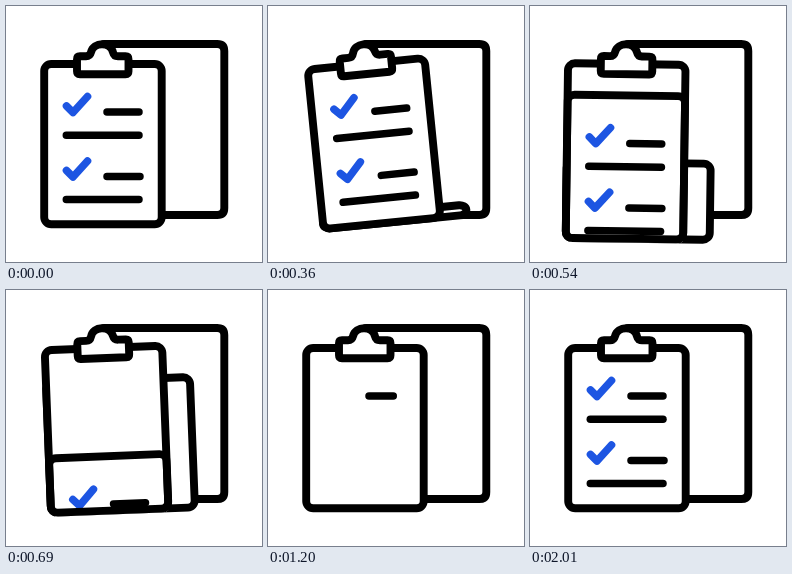
An HTML page that plays this animation: 256 px wide and 256 px high, repeating every 2280 ms.

```html
<!DOCTYPE html>
<html lang="en">
<head>
<meta charset="utf-8">
<title>Clipboard checklist</title>
<style>
html, body { margin: 0; width: 100%; height: 100%; overflow: hidden; background: #fff; }
svg { display: block; width: 100vw; height: 100vh; }
.ink { fill: #fff; stroke: #000; stroke-width: 7.9; stroke-linecap: round; stroke-linejoin: round; }
.line { stroke-width: 7.5; }
.tick { fill: none; stroke: #1d55e2; stroke-width: 7.6; }
#front { fill: #fff; }
#outline { fill: none; }
</style>
</head>
<body>
<svg viewBox="0 0 256 256">
  <defs><clipPath id="sheetClip"><rect id="clipBox" x="34.2" y="54" width="125.500" rx="10"/></clipPath></defs>
  <path class="ink" d="M98 38H211.300Q218.300 38 218.300 45V202Q218.300 209 211.300 209H150"/>
  <g id="board">
    <rect id="spare" class="ink" x="38.2" rx="7"/>
    <rect id="front" x="38.2" y="58" width="117.500" rx="7"/>
    <g clip-path="url(#sheetClip)">
      <g id="sheet">
        <rect id="sheetEdge" class="ink" x="38.2" y="58" width="117.500" height="190" rx="7"/>
        <g id="marks"></g>
      </g>
    </g>
    <rect id="outline" class="ink" x="38.2" y="58" width="117.500" rx="7"/>
    <path class="ink" d="M74 50.300H80Q84 50.300 85 46.300C87.500 35.600 104.500 35.600 107 46.300Q108 50.300 112 50.300H119.500Q122.500 50.300 122.500 53.300V65.200Q122.500 68.200 119.500 68.200H74Q71 68.200 71 65.200V53.300Q71 50.300 74 50.300Z"/>
  </g>
</svg>
<script>
const LOOP = 2280, TOP = 58, REST = 218.2;
const $ = id => document.getElementById(id);
const set = (el, attrs) => { for (const k in attrs) el.setAttribute(k, attrs[k]); };
const ramp = (t, a, b) => Math.min(1, Math.max(0, (t - a) / (b - a)));
const ease = (t, a, b) => (1 - Math.cos(Math.PI * ramp(t, a, b))) / 2;

// Each mark is a path and the time span in which it is drawn.
const tick = y => `M60.500 ${y}L67 ${y + 6.5}L81.500 ${y - 9.5}`;
const marks = [
  ['line', 'M101 106H133', 1110, 1230],
  ['line', 'M60.300 129.300H133', 1230, 1400],
  ['line', 'M101 170.500H134', 1400, 1500],
  ['line', 'M60.300 193.500H133', 1500, 1675],
  ['tick', tick(100), 1675, 1840],
  ['tick', tick(164.5), 1840, 2005]
].map(([kind, d, from, to]) => {
  const el = document.createElementNS('http://www.w3.org/2000/svg', 'path');
  set(el, { class: 'ink ' + kind, d });
  $('marks').append(el);
  return { el, from, to, length: el.getTotalLength() };
});

// Swing of the board: time, angle.
const swing = [[0, 0], [200, 3.9], [450, -9.5], [573, 2.7], [700, -2.3], [840, 0]];

function angleAt(t) {
  let angle = 0;
  for (let i = 1; i < swing.length; i++) {
    const [a, from] = swing[i - 1], [b, to] = swing[i];
    if (t >= a) angle = from + (to - from) * ease(t, a, b);
  }
  return angle;
}

function draw(t) {
  const bottom = REST + 14.5 * Math.sin(Math.PI * ramp(t, 380, 710));
  const height = bottom - TOP;
  const erased = t >= 870;

  set($('board'), { transform: `rotate(${angleAt(t)} 96 47)` });
  set($('front'), { height });
  set($('outline'), { height });
  set($('clipBox'), { height: height + 8 });

  const rise = height * ease(t, 262, 870);
  const reach = 26.5 * ease(t, 240, 320) * (1 - ease(t, 990, 1180));
  set($('spare'), { y: bottom - rise, height: rise, width: 117.5 + reach });
  $('spare').style.display = reach > 0 ? '' : 'none';

  const drop = erased ? 0 : 160 * ease(t, 405, 870);
  set($('sheet'), { transform: `translate(0 ${drop})` });
  $('sheetEdge').style.display = drop > 0 ? '' : 'none';

  for (const { el, from, to, length } of marks) {
    const part = erased ? ramp(t, from, to) : 1;
    el.style.display = part > 0 ? '' : 'none';
    el.style.strokeDasharray = part < 1 ? `${length * part} ${length * 2}` : 'none';
  }
}

const start = performance.now();
function nextFrame() {
  draw((performance.now() - start) % LOOP);
  requestAnimationFrame(nextFrame);
}
nextFrame();
</script>
</body>
</html>
```
